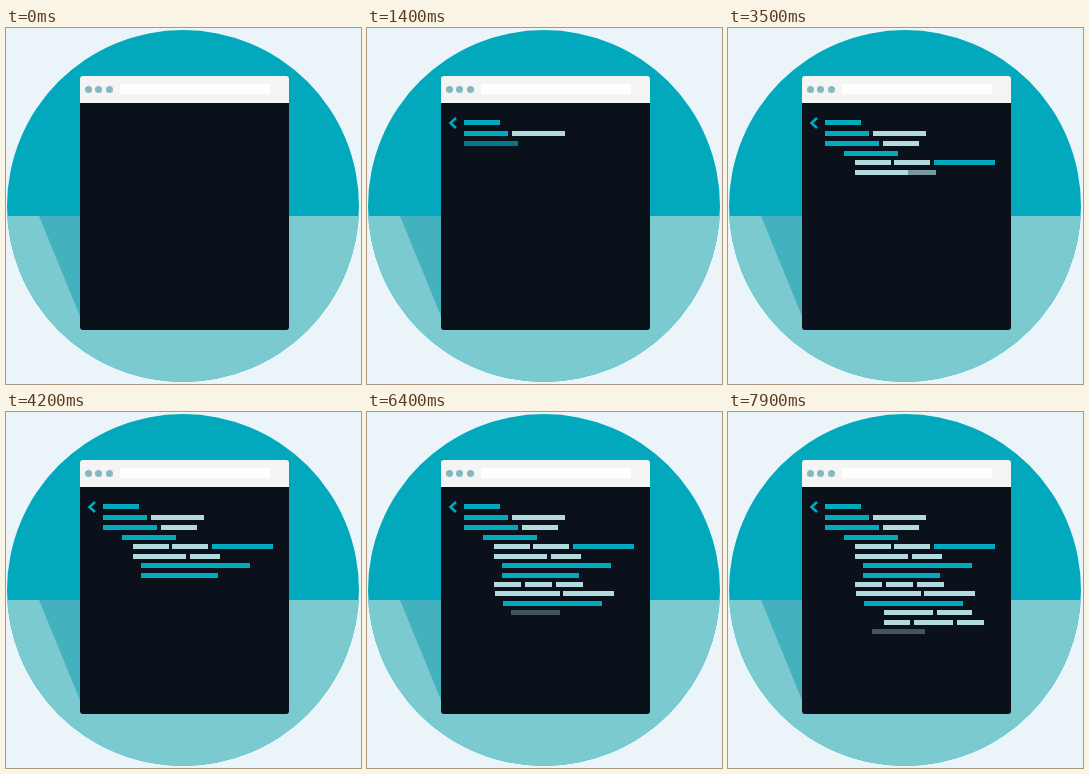
Animation of 355 by 356 pixels, one loop 8000 ms. Source, as an HTML page with a canvas:

```html
<!DOCTYPE html>
<html lang="en">
<head>
<meta charset="utf-8">
<title>Code window</title>
<style>
html, body { margin: 0; width: 100%; height: 100%; overflow: hidden; background: #ebf5f9; }
canvas { display: block; }
</style>
</head>
<body>
<canvas id="stage" width="355" height="356"></canvas>
<script>
const ctx = document.getElementById('stage').getContext('2d');
const LOOP = 8000, STEP = 100, STEPS_PER_ITEM = 3, SLIDE = 12;
const TEAL = '#02aabd', PALE = '#b3dade', DARK = '#0a111a';

// Bars in order of appearance: x, y, width, colour
const bars = [
  [97, 92, 36, TEAL], [97, 103, 44, TEAL], [145, 103, 53, PALE],
  [97, 113, 54, TEAL], [155, 113, 36, PALE],
  [116, 123, 54, TEAL],
  [127, 132, 36, PALE], [166, 132, 36, PALE], [206, 132, 61, TEAL],
  [127, 142, 53, PALE], [184, 142, 30, PALE],
  [135, 151, 109, TEAL],
  [135, 161, 77, TEAL],
  [127, 170, 27, PALE], [158, 170, 27, PALE], [189, 170, 27, PALE],
  [128, 179, 65, PALE], [196, 179, 51, PALE],
  [136, 189, 54, TEAL], [181, 189, 54, TEAL],
  [156, 198, 49, PALE], [209, 198, 35, PALE],
  [156, 208, 26, PALE], [186, 208, 39, PALE], [229, 208, 27, PALE],
  [156, 217, 53, PALE]
];
const FIRST_SLIDING = 5;

function rect(x, y, w, h, color) {
  ctx.fillStyle = color;
  ctx.fillRect(x, y, w, h);
}

function disc(x, y, r, color) {
  ctx.fillStyle = color;
  ctx.beginPath();
  ctx.arc(x, y, r, 0, Math.PI * 2);
  ctx.fill();
}

function drawScene() {
  rect(0, 0, 355, 356, '#ebf5f9');

  disc(177, 178, 176, '#02a9bc');
  ctx.save();
  ctx.beginPath();
  ctx.rect(0, 188, 355, 168);
  ctx.clip();
  disc(177, 178, 176, '#7acad0');
  ctx.restore();

  ctx.fillStyle = '#44b1bf';
  ctx.beginPath();
  ctx.moveTo(33, 188);
  ctx.lineTo(76, 188);
  ctx.lineTo(76, 293);
  ctx.fill();

  ctx.save();
  ctx.beginPath();
  ctx.roundRect(74, 48, 209, 254, 3);
  ctx.clip();
  rect(74, 48, 209, 27, '#f4f4f4');
  rect(74, 75, 209, 227, DARK);
  ctx.restore();

  for (const x of [82.5, 92.5, 103.5]) disc(x, 61.5, 3.5, '#85b8bf');
  rect(114, 56, 150, 10, '#ffffff');
}

function drawChevron() {
  ctx.strokeStyle = TEAL;
  ctx.lineWidth = 2.6;
  ctx.beginPath();
  ctx.moveTo(89, 90);
  ctx.lineTo(83.5, 95);
  ctx.lineTo(89, 100);
  ctx.stroke();
}

// Visibility of the nth item: 0, 1/3, 2/3 or 1
function reveal(n, step) {
  const k = (step - n * STEPS_PER_ITEM) / STEPS_PER_ITEM;
  return Math.max(0, Math.min(1, k));
}

function draw(t) {
  const step = Math.floor(t / STEP);
  drawScene();
  ctx.globalAlpha = reveal(0, step);
  drawChevron();
  bars.forEach(([x, y, w, color], i) => {
    const p = reveal(i + 1, step);
    if (!p) return;
    const dx = i < FIRST_SLIDING ? 0 : SLIDE * (1 - p) * 1.5;
    ctx.globalAlpha = p;
    rect(Math.round(x - dx), y, w, 5, color);
  });
  ctx.globalAlpha = 1;
}

const start = performance.now();
function tick() {
  draw((performance.now() - start) % LOOP);
  requestAnimationFrame(tick);
}
tick();
</script>
</body>
</html>
```
